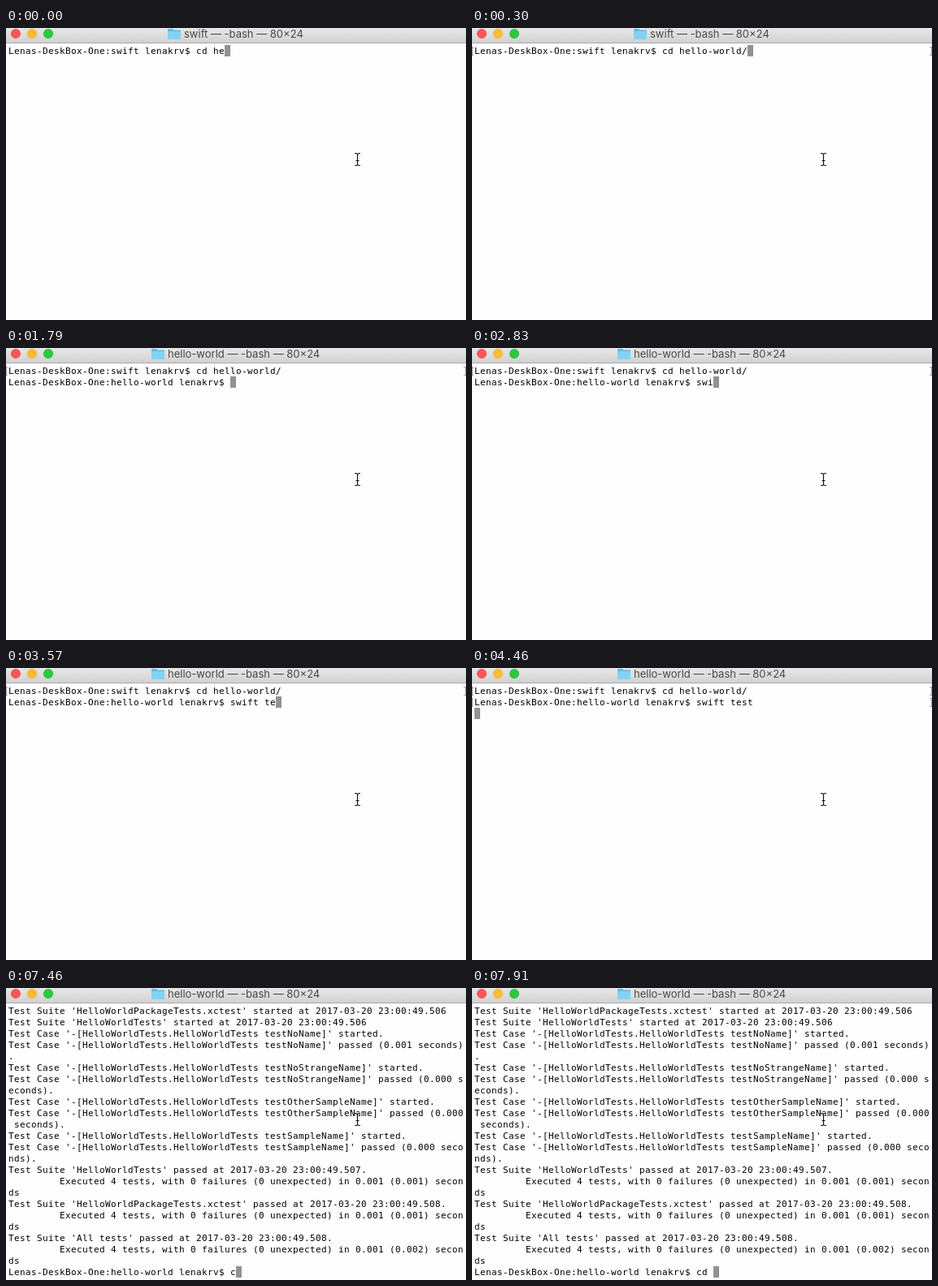
Write an HTML page with a canvas that moves like this. It is 566 px wide and 360 px high and loops after 8000 ms.

```html
<!DOCTYPE html>
<html lang="en">
<head>
<meta charset="utf-8">
<title>Terminal</title>
<style>
  html, body { margin: 0; width: 100%; height: 100%; overflow: hidden; background: #fefefe; }
  canvas { display: block; }
</style>
</head>
<body>
<canvas id="stage" width="566" height="360"></canvas>
<script>
const ctx = document.getElementById('stage').getContext('2d');
const W = 566, H = 360, LOOP = 8000;
const LEFT = 3, TOP = 21, CELL_W = 7, CELL_H = 14, COLS = 80;

const prompt = dir => `Lenas-DeskBox-One:${dir} lenakrv$ `;

// Key presses: [time, characters typed so far]
const CD_KEYS = [[0, 5], [300, 15]];
const TEST_KEYS = [[2530, 1], [2680, 2], [2830, 3], [2980, 4], [3130, 5],
                   [3270, 6], [3570, 8], [3870, 9], [4020, 10]];
const NEXT_KEYS = [[7460, 1], [7760, 2], [7910, 3]];

function typed(text, keys, t) {
  let count = 0;
  for (const [at, n] of keys) if (t >= at) count = n;
  return text.slice(0, count);
}

function testLog() {
  const day = '2017-03-20 23:00:49.';
  const lines = [
    `Test Suite 'HelloWorldPackageTests.xctest' started at ${day}506`,
    `Test Suite 'HelloWorldTests' started at ${day}506`
  ];
  const cases = [['NoName', 1], ['NoStrangeName', 0], ['OtherSampleName', 0], ['SampleName', 0]];
  for (const [name, ms] of cases) {
    const head = `Test Case '-[HelloWorldTests.HelloWorldTests test${name}]'`;
    lines.push(`${head} started.`, `${head} passed (0.00${ms} seconds).`);
  }
  const suites = [['HelloWorldTests', 7, 1], ['HelloWorldPackageTests.xctest', 8, 1], ['All tests', 8, 2]];
  for (const [name, end, ms] of suites) {
    lines.push(`Test Suite '${name}' passed at ${day}50${end}.`,
      ' '.repeat(9) + `Executed 4 tests, with 0 failures (0 unexpected) in 0.001 (0.00${ms}) seconds`);
  }
  return lines.flatMap(wrap);
}

function wrap(line) {
  const rows = [];
  for (let i = 0; i < line.length; i += COLS) rows.push(line.slice(i, i + COLS));
  return rows;
}

const LOG = testLog();

// The cursor sits at the end of the last row.
function screenAt(t) {
  if (t >= 4610) {
    return { rows: [...LOG, prompt('hello-world') + typed('cd ', NEXT_KEYS, t)], marks: 0 };
  }
  const rows = [prompt('swift') + typed('cd hello-world/', CD_KEYS, t)];
  if (t >= 1790) rows.push(prompt('hello-world') + typed('swift test', TEST_KEYS, t));
  else if (t >= 1640) rows.push('');
  if (t >= 4460) rows.push('');
  return { rows, marks: t >= 4460 ? 2 : t >= 300 ? 1 : 0 };
}

function rect(x, y, w, h, color) {
  ctx.fillStyle = color;
  ctx.fillRect(x, y, w, h);
}

function drawLight(x, fill, edge) {
  ctx.beginPath();
  ctx.arc(x, 7, 5.75, 0, Math.PI * 2);
  ctx.fillStyle = fill;
  ctx.fill();
  ctx.strokeStyle = edge;
  ctx.lineWidth = 0.5;
  ctx.stroke();
}

function drawFolder(x) {
  ctx.fillStyle = '#5fbbe8';
  ctx.beginPath();
  ctx.roundRect(x, 1, 7, 5, 1);
  ctx.roundRect(x, 2.5, 16, 11, 1);
  ctx.fill();
  ctx.fillStyle = '#7fd2f8';
  ctx.beginPath();
  ctx.roundRect(x, 4, 16, 9, 1);
  ctx.fill();
}

function drawTitleBar(dir, x) {
  const shade = ctx.createLinearGradient(0, 0, 0, 18);
  shade.addColorStop(0, '#e7e7e7');
  shade.addColorStop(1, '#d2d2d2');
  rect(0, 0, W, 18, shade);
  rect(0, 18, W, 1, '#a9a9a9');
  drawLight(12, '#fc5753', '#df4744');
  drawLight(32, '#fdbc32', '#de9f34');
  drawLight(52, '#2ac942', '#1fa934');
  drawFolder(x);
  ctx.font = '13px Inter, sans-serif';
  ctx.fillStyle = '#484848';
  ctx.fillText(`${dir} — -bash — 80×24`, x + 20, 12);
}

function drawMarks(row) {
  const y = TOP + row * CELL_H + 2;
  const gray = '#a6a6a6';
  rect(0, y, 1, 11, gray);
  rect(565, y, 1, 11, gray);
  for (const end of [y, y + 10]) {
    rect(1, end, 1, 1, gray);
    rect(563, end, 2, 1, gray);
  }
}

function drawText(rows) {
  const last = rows.length - 1;
  rect(LEFT + rows[last].length * CELL_W, TOP + last * CELL_H, CELL_W, CELL_H, '#929292');
  ctx.font = '11px "DejaVu Sans Mono", monospace';
  ctx.fillStyle = '#000';
  rows.forEach((row, r) => {
    for (let c = 0; c < row.length; c++) {
      if (row[c] !== ' ') ctx.fillText(row[c], LEFT + c * CELL_W, TOP + 11 + r * CELL_H);
    }
  });
}

function drawPointer() {
  const beam = new Path2D(
    'M429 154.5H430.5Q432.5 154.5 432.5 156.5V168Q432.5 169.5 430.5 169.5H429' +
    'M436 154.5H434.5Q432.5 154.5 432.5 156.5M432.5 168Q432.5 169.5 434.5 169.5H436' +
    'M430.5 163.5H434.5');
  for (const [width, color] of [[2.6, 'rgba(255,255,255,.8)'], [1.2, '#111']]) {
    ctx.lineWidth = width;
    ctx.strokeStyle = color;
    ctx.stroke(beam);
  }
}

function draw(t) {
  const { rows, marks } = screenAt(t);
  rect(0, 0, W, H, '#fefefe');
  if (t < 1790) drawTitleBar('swift', 199);
  else drawTitleBar('hello-world', 179);
  for (let i = 0; i < marks; i++) drawMarks(i);
  drawText(rows);
  drawPointer();
}

const start = performance.now();
function tick() {
  draw((performance.now() - start) % LOOP);
  requestAnimationFrame(tick);
}
tick();
</script>
</body>
</html>
```
